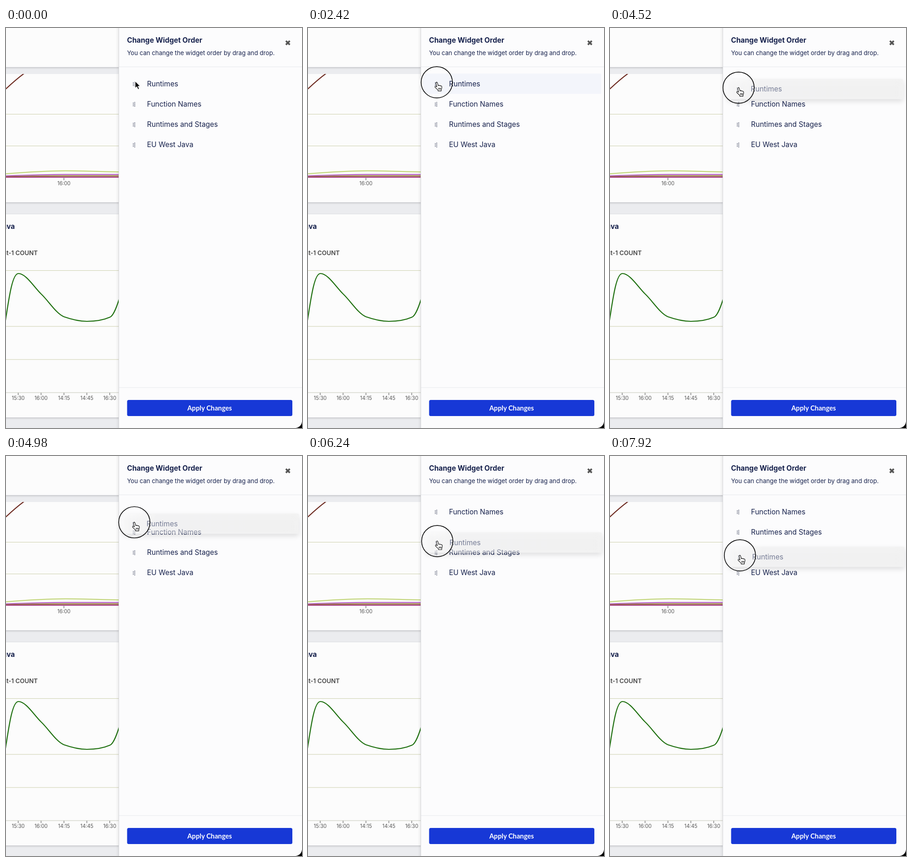
An HTML page for the animation above (8000 ms loop, 644 by 870 pixels).

```html
<!DOCTYPE html>
<html lang="en">
<head>
<meta charset="utf-8">
<style>
  html, body { margin: 0; width: 100%; height: 100%; overflow: hidden; background: #fcfcfd; }
  svg { display: block; width: 644px; height: 870px; font-family: Inter, sans-serif; }
  .chart { fill: none; stroke-width: 2.2; }
  .axis { font-size: 11.05px; fill: #555; text-anchor: middle; }
  .heading { font-size: 15.47px; font-weight: 700; fill: #17224d; }
  .row { font-size: 15.47px; fill: #17224d; }
</style>
</head>
<body>
<svg viewBox="0 0 644 870">
  <defs>
    <linearGradient id="edge"><stop stop-color="#000" stop-opacity="0"/><stop offset="1" stop-color="#000" stop-opacity=".07"/></linearGradient>
    <linearGradient id="under" x2="0" y2="1"><stop stop-color="#000" stop-opacity=".13"/><stop offset="1" stop-color="#000" stop-opacity="0"/></linearGradient>
    <linearGradient id="lifted"><stop stop-color="#f4f4f4" stop-opacity=".3"/><stop offset=".2" stop-color="#e8e8e8"/><stop offset="1" stop-color="#e6e6e6"/></linearGradient>
    <filter id="shadow" x="-10%" y="-60%" width="120%" height="220%"><feGaussianBlur stdDeviation="6"/></filter>
    <clipPath id="board"><rect width="246" height="870"/></clipPath>
    <clipPath id="upperChart"><rect y="100" width="246" height="280"/></clipPath>
    <clipPath id="panelArea"><rect x="240" y="85" width="404" height="690"/></clipPath>
  </defs>

  <g clip-path="url(#board)">
    <rect width="246" height="870" fill="#ebecef"/>
    <g fill="#fcfcfc">
      <rect width="246" height="85"/>
      <rect y="100" width="246" height="279"/>
      <rect y="404" width="246" height="443"/>
    </g>
    <g fill="url(#under)">
      <rect y="85" width="246" height="5"/><rect y="379" width="246" height="5"/><rect y="847" width="246" height="5"/>
    </g>
    <path d="M0 85.5H246M0 379.5H246M0 847.5H246" stroke="#c9cacf"/>
    <path d="M0 404.5H246" stroke="#dcdde1"/>
    <path d="M0 187.5H246M0 256.5H246M0 527.5H246M0 649H246M0 721H246" stroke="#cdd0ae" stroke-width="1.1"/>
    <path d="M0 793H246" stroke="#c4c6b8"/>
    <g class="chart">
      <path clip-path="url(#upperChart)" d="M-2 134C12 121 25 109 42 97" stroke="#6d2a20"/>
      <path d="M0 317.2C50 313 90 310.6 130 310.6S205 312.5 246 313.2" stroke="#c3d67c"/>
      <path d="M0 321.6C45 320 85 318.6 126 318.6H246" stroke="#b45cc4"/>
      <path d="M0 323.4C45 322.4 85 321.6 126 321.6H246" stroke="#97802f"/>
      <path d="M0 324.3H246" stroke="#9c2a74"/>
      <path d="M-1 636C8 575 15 534 27 534C43 534 60 562 76 578C93 594 109 621 126 628C143 634 160 638 176 638C193 638 210 636 226 629C234 626 241 606 247 587" stroke="#1f7010"/>
    </g>
    <g id="axes"></g>
    <text class="heading" x="19.3" y="437" text-anchor="end">EU West Java</text>
    <text x="69" y="493.6" text-anchor="end" font-size="13.26" font-weight="600" fill="#454545">eu-west-1 COUNT</text>
    <rect x="239" width="7" height="870" fill="url(#edge)"/>
  </g>

  <rect x="246" width="398" height="870" fill="#fcfcfd"/>
  <path d="M245.5 0V870" stroke="#d6d7db"/>
  <path d="M246 84.5H644M246 782H644" stroke="#e6e8ed"/>
  <text class="heading" x="263.2" y="31.6">Change Widget Order</text>
  <text x="263.4" y="59.4" font-size="13.2" fill="#17224d">You can change the widget order by drag and drop.</text>
  <path d="M609 28L617.4 36.4M617.4 28L609 36.4" stroke="#555" stroke-width="3.8"/>
  <rect x="263.5" y="809" width="359.5" height="35" rx="3.5" fill="#1738d6"/>
  <text x="443" y="832.4" text-anchor="middle" font-size="14.7" font-weight="700" fill="#fff" style="font-family:Lato,sans-serif">Apply Changes</text>

  <g id="rows" class="row" clip-path="url(#panelArea)"></g>

  <g id="pointer">
    <circle id="press" r="34" fill="none" stroke="#111" stroke-width="1.7"/>
    <path id="arrow" transform="translate(.8 -2.6) scale(1.06)" d="M0 0V14.8L3.4 11.5L5.8 17L8.5 15.9L6.1 10.5H10.7Z" fill="#000" stroke="#fff" stroke-width="1.1"/>
    <g id="hand" stroke="#111" stroke-width="1.15" stroke-linejoin="round">
      <path fill="#fff" d="M-1.8 1.8C-2-.5 .8-.8 1.4 1.2L3.2 7.3C3.6 6 5.4 6.1 5.9 7.4C6.5 6.4 8 6.8 8.4 8C9.3 7.2 10.9 8 11 9.6C11.2 12 10.8 14 9.7 16V18.6H2.7V17C1 15-2 12.5-3.8 10.7C-4.7 9-2.8 7.6-1.4 8.8L.2 10Z"/>
      <path fill="none" d="M4 12V15.6M6.2 12V15.6M8.3 12V15.6"/>
    </g>
  </g>
  <path d="M644 856V870H630C638 869 643 864 644 856Z" fill="#000"/>
</svg>
<script>
const LOOP = 8000, ROW_HEIGHT = 44.2, FIRST_ROW = 121.2;
const HOVER = 700, PRESS = 2400, LIFT = 4150, SWAP_TIME = 150;
const rowNames = ['Runtimes', 'Function Names', 'Runtimes and Stages', 'EU West Java'];
const swapStarts = [0, 5400, 7020, Infinity];
// time, x offset, y offset of the drag
const dragPath = [[LIFT, 0, 0], [4980, -1, 26], [5640, .8, 48], [6940, 1.3, 89], [7300, 1.8, 94.5], [7920, 2.5, 98]];

const byId = id => document.getElementById(id);
const show = (node, visible) => node.setAttribute('visibility', visible ? 'visible' : 'hidden');
const move = (node, x, y) => node.setAttribute('transform', `translate(${x} ${y})`);
const clamp = v => Math.min(1, Math.max(0, v));

const tick = (label, x, y) =>
  `<path d="M${x} ${y}v5" stroke="#555" stroke-width="1.1"/><text class="axis" x="${x}" y="${y + 15.7}">${label}</text>`;
byId('axes').innerHTML = tick('16:00', 126, 326) +
  ['15:30', '16:00', '14:15', '14:45', '16:30'].map((label, i) => tick(label, 26.5 + i * 49.8, 793.5)).join('');

const dots = (x, ys) => ys.map(y => `M${x} ${y}h1.5v1.5h-1.5z`).join('');
const grip = `<path d="${dots(276.2, [-3, 0, 3])}${dots(279.4, [-4.3, -1.5, 1.3, 4.1])}" fill="#333a55"/>`;
const rowContent = name => `${grip}<text x="306.8" y="5.6">${name}</text>`;
byId('rows').innerHTML = rowNames.slice(1).map(name => `<g class="item">${rowContent(name)}</g>`).join('') +
  `<g id="dragged">
    <rect id="hover" x="250" y="-22" width="388" height="44" rx="2" fill="#f3f5fb"/>
    <g id="raised">
      <rect x="256" y="-17" width="382" height="44" fill="#000" opacity=".2" filter="url(#shadow)"/>
      <rect x="250" y="-22" width="388" height="44" rx="2" fill="#fcfcfd" opacity=".75"/>
      <rect x="250" y="-22" width="388" height="44" rx="2" fill="url(#lifted)" opacity=".7"/>
    </g>
    ${rowContent(rowNames[0])}
  </g>`;
const items = document.querySelectorAll('.item');

function dragOffset(t) {
  if (t <= LIFT) return [0, 0];
  const next = dragPath.findIndex(key => key[0] >= t);
  if (next < 0) return dragPath.at(-1).slice(1);
  const a = dragPath[next - 1], b = dragPath[next];
  const k = (t - a[0]) / (b[0] - a[0]);
  return [a[1] + (b[1] - a[1]) * k, a[2] + (b[2] - a[2]) * k];
}

function draw(t) {
  const [x, y] = dragOffset(t), lifted = t >= LIFT;
  items.forEach((item, i) => {
    const k = clamp((t - swapStarts[i + 1]) / SWAP_TIME);
    const eased = 1 - (1 - k) ** 3;
    move(item, 0, FIRST_ROW + ROW_HEIGHT * (i + 1 - eased));
  });
  move(byId('dragged'), x, FIRST_ROW + y);
  byId('dragged').setAttribute('opacity', lifted ? .58 : 1);
  show(byId('hover'), t >= HOVER && !lifted);
  show(byId('raised'), lifted);
  move(byId('pointer'), 280.2 + x, 118.2 + y);
  show(byId('arrow'), t < HOVER);
  show(byId('hand'), t >= HOVER);
  show(byId('press'), t >= PRESS);
}

const start = performance.now();
function frame() {
  draw((performance.now() - start) % LOOP);
  requestAnimationFrame(frame);
}
frame();
</script>
</body>
</html>
```
